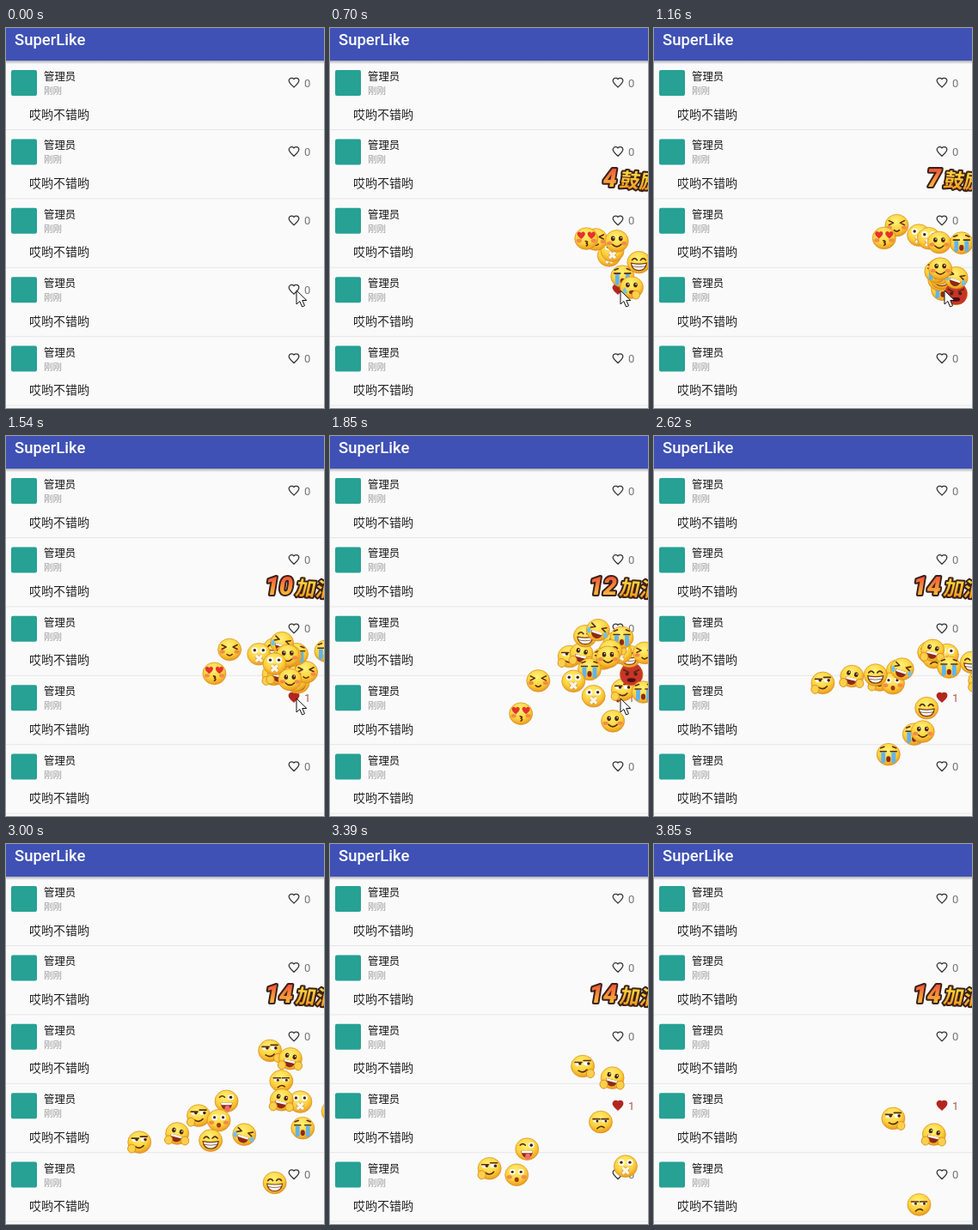
An HTML page for the animation above (3920 ms loop, 370 by 443 pixels).

```html
<!DOCTYPE html>
<html lang="zh-CN">
<head>
<meta charset="utf-8">
<title>SuperLike</title>
<style>
  html, body { margin: 0; width: 100%; height: 100%; overflow: hidden; background: #fafafa; }
  svg { display: block; width: 370px; height: 443px; }
  text { font-family: Roboto, "Noto Sans CJK SC", "Noto Sans CJK", sans-serif; }
  .combo { font-weight: 900; paint-order: stroke; stroke: #3a2118; stroke-width: 4; stroke-linejoin: round; }
  .line { fill: none; stroke: #5b2a0c; stroke-width: 1.6; stroke-linecap: round; stroke-linejoin: round; }
</style>
</head>
<body>
<svg viewBox="0 0 370 443">
  <defs>
    <radialGradient id="skin" cx=".45" cy=".32" r=".7">
      <stop offset="0" stop-color="#fff27a"/>
      <stop offset=".6" stop-color="#fdd23c"/>
      <stop offset="1" stop-color="#e8961c"/>
    </radialGradient>
    <linearGradient id="gold" x1="0" y1="0" x2="0" y2="1">
      <stop offset=".2" stop-color="#f4593a"/>
      <stop offset=".85" stop-color="#ffc33a"/>
    </linearGradient>
    <linearGradient id="amber" x1="0" y1="0" x2="0" y2="1">
      <stop offset=".2" stop-color="#ffd23c"/>
      <stop offset=".9" stop-color="#f79420"/>
    </linearGradient>
    <linearGradient id="shade" x1="0" y1="0" x2="0" y2="1">
      <stop offset="0" stop-color="#000" stop-opacity=".3"/>
      <stop offset="1" stop-color="#000" stop-opacity="0"/>
    </linearGradient>
  </defs>
  <rect width="370" height="443" fill="#fafafa"/>
  <g id="rows"></g>
  <rect width="370" height="38" fill="#3f51b5"/>
  <rect y="38" width="370" height="4" fill="url(#shade)"/>
  <text x="10" y="19.5" font-size="18.5" font-weight="500" fill="#fff">SuperLike</text>
  <g id="faces"></g>
  <g id="combo">
    <text id="digits" class="combo" x="334" y="185" text-anchor="end" font-size="29" font-style="italic" fill="url(#gold)"></text>
    <text id="cheer" class="combo" transform="translate(336 185) rotate(4) skewX(-8)" font-size="23" fill="url(#amber)"></text>
  </g>
  <path id="cursor" d="M338 306v16l3.8-3.4 2.7 6.4 3-1.3-2.7-6.2h5z" fill="#fff" stroke="#111" stroke-width="1"/>
</svg>
<script>
const LOOP = 3920, STEP = 76.9;
const ORIGIN = { x: 336, y: 305 }, GRAVITY = 200, LIFE = 2;
const CLICK = { first: 0.12, gap: 0.152, count: 14 };
const LIKED_ROW = 3;
const $ = id => document.getElementById(id);

// Comment list
const heart = 'M12 21.35l-1.45-1.32C5.4 15.36 2 12.28 2 8.5 2 5.42 4.42 3 7.5 3c1.74 0 3.41.81 4.5 2.09' +
  'C13.09 3.81 14.76 3 16.5 3 19.58 3 22 5.42 22 8.5c0 3.78-3.4 6.86-8.55 11.54z';
const row = i => `<g transform="translate(0 ${(i * 80.4).toFixed(1)})">
  <rect x="6" y="49" width="30" height="30" rx="2" fill="#26a194"/>
  <text x="44" y="61" font-size="12.4" fill="#111">管理员</text>
  <text x="44" y="77" font-size="10.5" fill="#9a9a9a">刚刚</text>
  <text x="27" y="105.5" font-size="14" fill="#222">哎哟不错哟</text>
  <path d="M0 118.5h370" stroke="#e6e6e8"/>
  <path class="heart" d="${heart}" transform="translate(335 63.5) scale(.58) translate(-12 -12)"
    fill="none" stroke="#333" stroke-width="2.2"/>
  <text class="likes" x="347" y="68.5" font-size="13" fill="#757575">0</text>
</g>`;
$('rows').innerHTML = [0, 1, 2, 3, 4].map(row).join('');
const likedHeart = document.querySelectorAll('.heart')[LIKED_ROW];
const likedCount = document.querySelectorAll('.likes')[LIKED_ROW];

// Emoji pieces, drawn around 0,0
const line = (d, extra = '') => `<path class="line" d="${d}" ${extra}/>`;
const fill = (d, color) => `<path d="${d}" fill="${color}"/>`;
const dot = (x, y, rx, ry = rx, color = '#4a220a') =>
  `<ellipse cx="${x}" cy="${y}" rx="${rx}" ry="${ry}" fill="${color}"/>`;
const both = draw => draw(-1) + draw(1);
const hand = (x, y) => `<ellipse cx="${x}" cy="${y}" rx="4.6" ry="5" fill="#fbd04a" stroke="#dc8a1a" stroke-width=".9"/>`;
const blush = both(s => dot(s * 8.5, 3, 3, 2.2, '#f58a4a'));
const eyes = both(s => dot(s * 4.5, -2.5, 2.3, 2.8) + dot(s * 4.5 + 0.6, -3.4, 0.8, 0.8, '#fff'));
const happyEyes = both(s => line(`M${s * 5 - 3} -2q3 -4 6 0`));
const sideEyes = both(s => dot(s * 5, -2.5, 4, 2.4, '#fff') + dot(s * 5 + 1.8, -2.5, 1.8)
  + line(`M${s * 5 - 4} ${-5 - s}h8`));
const squint = line('M-9 -5l5 2.5-5 2.5M9 -5l-5 2.5 5 2.5');
const openMouth = fill('M-7 2.5H7Q6 10.5 0 10.5T-7 2.5z', '#8e2a14') + fill('M-6.6 2.5H6.6L6 5H-6z', '#fff');
const bigGrin = `<path d="M-9 1.5Q0 3.5 9 1.5 8 10 0 10T-9 1.5z" fill="#fff" stroke="#7a3a12" stroke-width="1.2"/>`
  + line('M-8 5.2Q0 7 8 5.2', 'style="stroke-width:.7"');
const love = x => fill(`M${x} 1q-4.6-3.6-4.6-6 0-2.5 2.3-2.5 1.6 0 2.3 1.5 .7-1.5 2.3-1.5 2.3 0 2.3 2.5 0 2.4-4.6 6z`, '#e5322d');
const tear = (x, y) => fill(`M${x} ${y}q-4 5-1 7t4-1z`, '#6cc1f2');
const cross = `<g transform="rotate(45 0 5.5)">
  <path d="M-5 5.5H5M0 .5v10" stroke="#c58a4a" stroke-width="4.6"/>
  <path d="M-5 5.5H5M0 .5v10" stroke="#fff5e2" stroke-width="3.4"/></g>`;

const faces = {
  kiss: both(s => love(s * 6)) + blush + line('M-1 3.5q4 .5 1 2.4 3 1.500 0 3'),
  shy: squint + blush + line('M-3 6q3 3 6 0'),
  mute: both(s => dot(s * 5, -4, 3.6, 3.6, '#fff') + dot(s * 5, -4, 1.7)) + cross,
  smile: eyes + blush + line('M-5 4.5q5 5 10 0'),
  cry: both(s => line(`M${s * 6 - 3.5} -3h7`) + fill(`M${s * 6 - 2.4} -2h4.8v11q-2.4 3-4.8 1z`, '#5fb4ee'))
    + dot(0, 6, 2.6, 3.4, '#8e2a14') + line('M-9 -7l4-1.500M9 -7l-4-1.500'),
  sob: eyes + tear(-8, 0) + dot(1, 6, 4, 2.4, '#8e2a14') + hand(5, 9),
  grin: happyEyes + bigGrin,
  laugh: `<g transform="rotate(18)">${squint + openMouth + tear(-10, -1) + tear(10, -1)}</g>`,
  smirk: sideEyes + line('M-5 5.500q6 4 10-1') + hand(-9, 8),
  sly: sideEyes + line('M-5 5.500q6 4 10-1') + hand(9, 9),
  wave: `<g transform="rotate(14)">${eyes + openMouth}</g>` + hand(-10, 8) + hand(9, 9),
  tongue: line('M-8 -4q3-3 6 0') + dot(5, -4, 3.4, 3.4, '#fff') + dot(5, -4, 1.8) + openMouth + dot(1, 9, 3, 3.4, '#ef6a72'),
  whistle: both(s => dot(s * 5, -3, 3.3, 3.3, '#fff') + dot(s * 5, -3, 1.6)) + dot(0, 6, 2.5, 2.8, '#a33a1a') + blush,
  annoyed: both(s => dot(s * 5, -1, 3.6, 2.2, '#fff') + dot(s * 5 + 1, -0.6, 1.5) + line(`M${s * 5 - 4} -3h8`))
    + line('M-4 8q4-4 8-1'),
  angry: fill('M-13 -1Q-11 -13 0 -13T13 -1Q13 13 0 13T-13 -1z', '#c8342a')
    + line('M-9 -5l6 3M9 -5l-6 3') + both(s => dot(s * 5, 0, 2)) + dot(0, 7, 5, 2.4, '#4d0f0c'),
};
const head = '<ellipse cy=".5" rx="13.5" ry="12.8" fill="url(#skin)" stroke="#d98a1e" stroke-width=".7"/>';

// Each emoji: face, launch time (s), horizontal and upward speed (px/s)
const shots = [
  ['kiss', .12, -66, 162], ['smile', .12, -4, 157], ['shy', .23, -58, 174],
  ['mute', .3, -19, 156], ['mute', .38, -36, 160], ['grin', .4, 80, 140],
  ['sob', .55, 105, 35], ['cry', .58, 38, 153],
  ['cry', .95, -38, 127], ['smile', .95, -14, 143], ['cry', .951, -20, 141],
  ['laugh', .98, 90, 100], ['angry', 1.02, 114, -20],
  ['laugh', 1.04, -30, 179], ['grin', 1.05, -12, 149], ['grin', 1.08, -51, 171],
  ['cry', 1.15, 5, 171], ['shy', 1.3, 55, 151],
  ['smirk', 1.31, -107, 144], ['wave', 1.31, -81, 150], ['wave', 1.312, -9, 173],
  ['mute', 1.4, 4, 163], ['grin', 1.41, 28, 155],
  ['cry', 1.6, 116, 53], ['angry', 1.65, 75, 160], ['smirk', 1.75, 50, 110],
  ['smirk', 1.88, -100, 102], ['tongue', 1.88, -71, 117],
  ['whistle', 1.88, -79, 97], ['annoyed', 1.88, -14, 138],
  ['sly', 2.15, -34, 161], ['wave', 2.15, -6, 150],
];

// Older emoji lie on top
const flock = shots.sort((a, b) => b[1] - a[1]).map(([face, born, vx, vy]) => {
  const node = document.createElementNS('http://www.w3.org/2000/svg', 'g');
  node.innerHTML = head + faces[face];
  $('faces').append(node);
  return { node, born, vx, vy };
});

const show = (node, on) => node.setAttribute('visibility', on ? 'visible' : 'hidden');

function draw(t) {
  for (const { node, born, vx, vy } of flock) {
    const age = t - born;
    const alive = age >= 0 && age <= LIFE;
    show(node, alive);
    if (!alive) continue;
    const x = ORIGIN.x + vx * age;
    const y = ORIGIN.y - vy * age + GRAVITY * age * age / 2;
    node.setAttribute('transform', `translate(${x.toFixed(2)} ${y.toFixed(2)})`);
  }

  const clicks = Math.max(0, Math.min(CLICK.count, Math.floor((t - CLICK.first) / CLICK.gap) + 1));
  show($('combo'), clicks > 1);
  $('digits').textContent = clicks;
  $('cheer').textContent = clicks < 10 ? '鼓励' : '加油';

  const liked = clicks > 0;
  likedHeart.setAttribute('fill', liked ? '#b3261e' : 'none');
  likedHeart.setAttribute('stroke', liked ? '#b3261e' : '#333');
  likedCount.textContent = liked ? 1 : 0;
  likedCount.setAttribute('fill', liked ? '#a8564e' : '#757575');

  show($('cursor'), t < 2.22);
}

const start = performance.now();
function tick() {
  const ms = (performance.now() - start) % LOOP;
  draw(Math.floor(ms / STEP) * STEP / 1000);
  requestAnimationFrame(tick);
}
tick();
</script>
</body>
</html>
```
